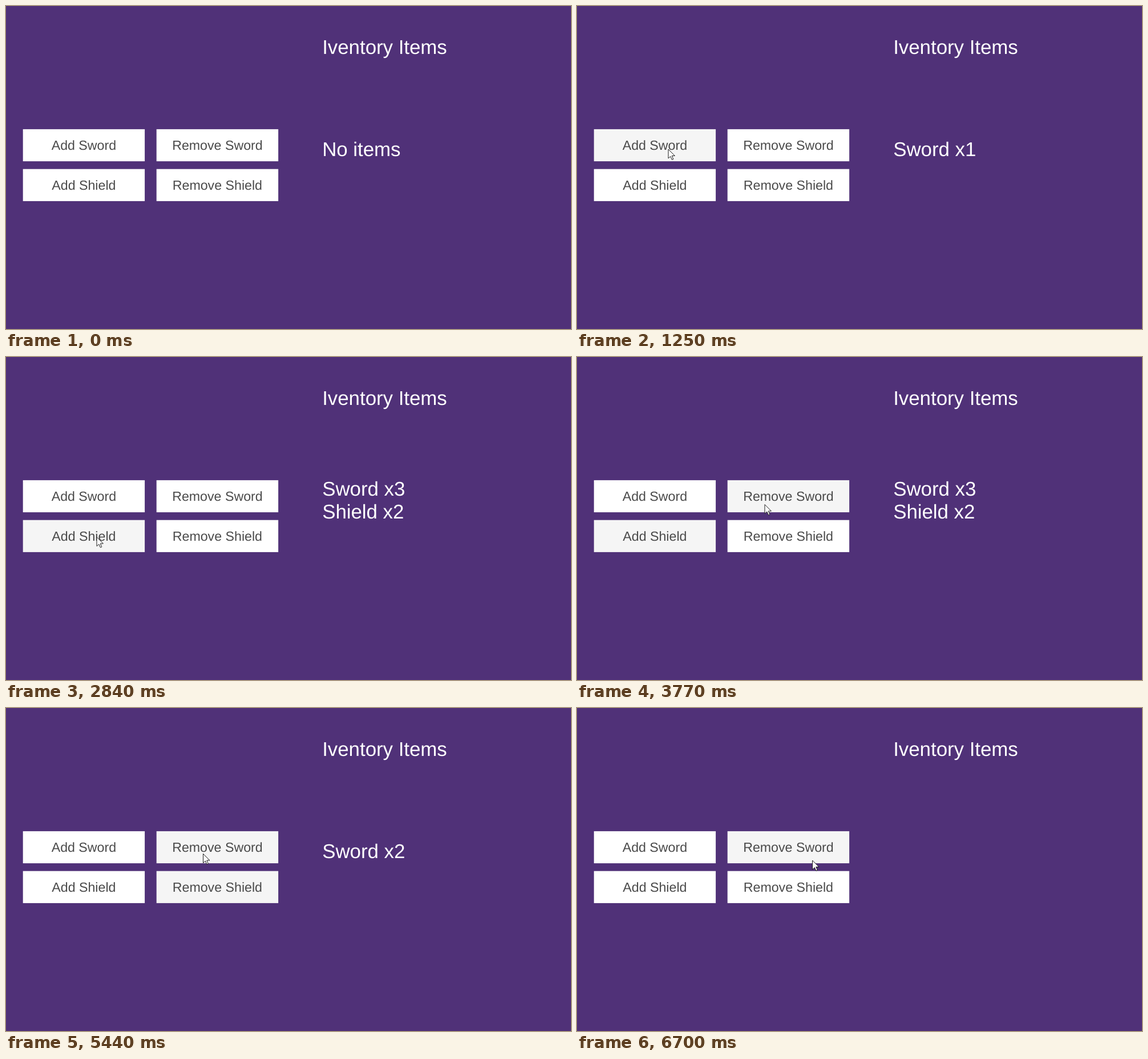
Write an HTML page that moves like this. It is 990x566 px and loops after 7.7 s.

```html
<!DOCTYPE html>
<html lang="en">
<head>
<meta charset="utf-8">
<title>Inventory demo</title>
<style>
  html, body { margin: 0; width: 100%; height: 100%; overflow: hidden; background: #503178; }
  svg { display: block; width: 990px; height: 566px; }
  text { font-family: "Liberation Sans", Arial, sans-serif; text-rendering: geometricPrecision; }
  .label { font-size: 23.2px; fill: #4a4a4a; text-anchor: middle; }
  .list { font-size: 34.8px; fill: #fff; }
</style>
</head>
<body>
<svg viewBox="0 0 990 566">
  <rect width="990" height="566" fill="#503178"/>
  <g id="buttons"></g>
  <text class="list" x="554.2" y="84">Iventory Items</text>
  <text class="list" x="554.2" id="line0"></text>
  <text class="list" x="554.2" id="line1"></text>
  <path id="cursor" d="M0 .5V16.5L3.8 13L6.4 18.8L8.8 17.8L6.3 12H11.4Z"
        fill="#fff" stroke="#1c1c1c" stroke-width="1"/>
</svg>
<script>
const LOOP = 7700, TICK = 1000 / 15, HOLD = 70;
const IDLE = 255, ACTIVE = 245, PRESSED = 200;
const WIDTH = 213.4, HEIGHT = 56.2;
const byId = id => document.getElementById(id);

function make(tag, attrs, text = '') {
  const el = document.createElementNS('http://www.w3.org/2000/svg', tag);
  for (const key in attrs) el.setAttribute(key, attrs[key]);
  el.textContent = text;
  byId('buttons').append(el);
  return el;
}

const buttons = [];
['Sword', 'Shield'].forEach((item, row) => {
  ['Add', 'Remove'].forEach((verb, column) => {
    const x = 29.7 + column * 234, y = 215.9 + row * 69.8;
    const rect = make('rect', { x, y, width: WIDTH, height: HEIGHT });
    make('text', { class: 'label', x: x + WIDTH / 2, y: 252 + row * 70 }, `${verb} ${item}`);
    buttons.push({ x, y, rect, item, change: column ? -1 : 1 });
  });
});
const [addSword, removeSword, addShield, removeShield] = buttons;

const clicks = [
  [addSword, 1110, 1510, 1850],
  [addShield, 2510, 2710],
  [removeSword, 3970],
  [removeShield, 4640, 4905],
  [removeSword, 5500, 6440],
].flatMap(([button, ...times]) => times.map(time => ({ button, time })));

const moves = [
  { from: 180, to: 920, path: [[644, 525], [545, 518], [321, 453], [190, 358], [159.5, 259]] },
  { from: 980, to: 1045, path: [[160, 255], [160, 250.5]] },
  { from: 2110, to: 2240, path: [[160, 275], [159, 315]] },
  { from: 3040, to: 3770, path: [[164, 328], [210, 366], [320, 350], [414, 280], [329, 258]] },
  { from: 3840, to: 3905, path: [[330, 255], [331, 252]] },
  { from: 4500, to: 4565, path: [[337.5, 294], [339, 311]] },
  { from: 5300, to: 5430, path: [[341, 286], [345.5, 255]] },
  { from: 5700, to: 6040, path: [[365, 265], [530, 365], [632, 413]] },
  { from: 6100, to: 6370, path: [[622, 408], [490, 318], [412, 262]] },
  { from: 6635, to: 6700, path: [[412, 264], [412.5, 266.5]] },
];

// Catmull-Rom curve through the path, with u running from 0 to 1.
function along(path, u) {
  const last = path.length - 1;
  const i = Math.min(last - 1, Math.floor(u * last)), t = u * last - i;
  const at = k => path[Math.max(0, Math.min(last, k))];
  return [0, 1].map(axis => {
    const [a, b, c, d] = [-1, 0, 1, 2].map(k => at(i + k)[axis]);
    return b + t / 2 * (c - a + t * (2 * a - 5 * b + 4 * c - d + t * (3 * (b - c) + d - a)));
  });
}

// The cursor advances in steps at 15 per second.
function cursorAt(time) {
  const move = moves.findLast(m => m.from <= time);
  if (!move) return null;
  const steps = Math.round((move.to - move.from) / TICK);
  const progress = Math.min(1, (time - move.from) / (move.to - move.from));
  return along(move.path, Math.floor(progress * steps + 1e-6) / steps);
}

function buttonState(button, time) {
  const click = clicks.findLast(c => c.time <= time);
  const selected = click?.button === button;
  if (selected && time < click.time + HOLD) return PRESSED;
  const tip = cursorAt(time);
  const hovered = tip && tip[0] > button.x && tip[0] < button.x + WIDTH
    && tip[1] > button.y && tip[1] < button.y + HEIGHT;
  return selected || hovered ? ACTIVE : IDLE;
}

// Averaging recent states gives a short fade between them.
function shade(button, time) {
  const recent = [0, 30, 60].map(ago => buttonState(button, time - ago));
  return Math.round(recent.reduce((sum, value) => sum + value) / recent.length);
}

function itemsAt(time) {
  const done = clicks.filter(c => c.time + HOLD <= time);
  if (!done.length) return ['No items'];
  const counts = { Sword: 0, Shield: 0 };
  for (const { button } of done) counts[button.item] += button.change;
  return Object.keys(counts).filter(item => counts[item]).map(item => `${item} x${counts[item]}`);
}

function draw(time) {
  for (const button of buttons) {
    const level = shade(button, time);
    button.rect.setAttribute('fill', `rgb(${level},${level},${level})`);
  }

  // The list is centred vertically, one line every 40px.
  const items = itemsAt(time);
  [0, 1].forEach(i => {
    const line = byId('line' + i);
    line.textContent = items[i] || '';
    line.setAttribute('y', 263 + 40 * (i - (items.length - 1) / 2));
  });

  const tip = cursorAt(time);
  byId('cursor').setAttribute('visibility', tip ? 'visible' : 'hidden');
  if (tip) byId('cursor').setAttribute('transform', `translate(${tip})`);
}

const origin = performance.now();
function tick() {
  draw((performance.now() - origin) % LOOP);
  requestAnimationFrame(tick);
}
tick();
</script>
</body>
</html>
```
